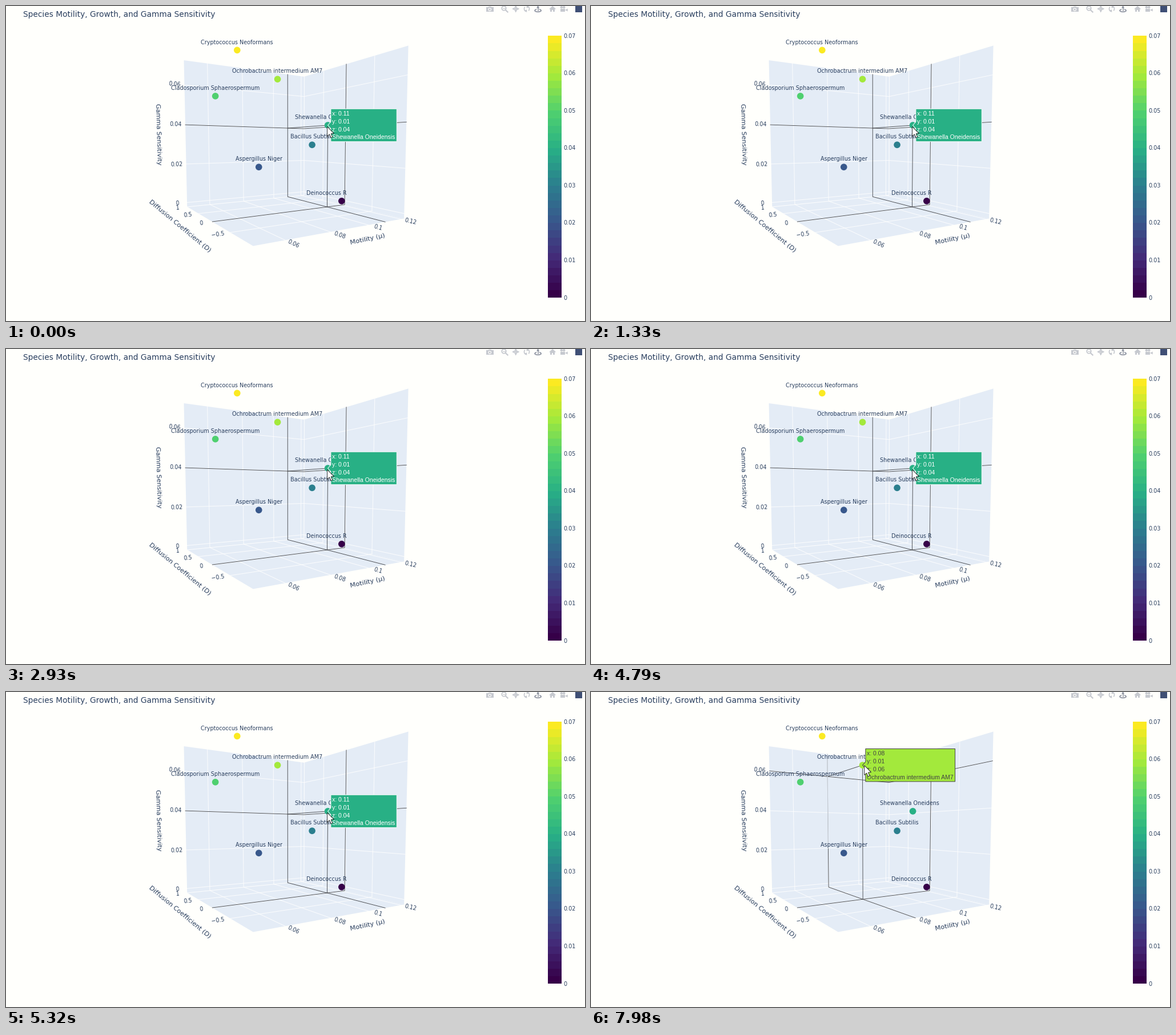
Animation, 1014 px wide and 552 px high, one loop 8 s. Source, as a matplotlib script:

```python
import math

import matplotlib.pyplot as plt
import numpy as np
from matplotlib.animation import FuncAnimation
from matplotlib.colors import LinearSegmentedColormap
from matplotlib.patches import Arc, Circle, Polygon

W, H, DPI = 1014, 552, 64
PT = 72 / DPI  # points per pixel
STEP, FRAMES, SWITCH = 50, 160, 6650

PAPER, WALL, INK = "#fffffc", "#e4ecf6", "#2a3f5f"
SPIKE, ICON = "#46484c", "#c6c9cf"
SCALE = LinearSegmentedColormap.from_list("scale", [
    "#360048", "#432a78", "#38588c", "#2b7f8e",
    "#28b085", "#4fd06f", "#a2e93c", "#fbea22"])

# Data ranges of the box: x motility, y diffusion, z sensitivity
LOW = np.array([0.0478, -0.99, -0.0022])
SPAN = np.array([0.0744, 2, 0.0744])
TICKS = [(0.06, 0.08, 0.1, 0.12), (-0.5, 0, 0.5, 1), (0, 0.02, 0.04, 0.06)]
DIFFUSION, TOP = 0.01, 0.07

# (x, z, name); the part after the bar is cut off in the label
SPECIES = [(0.06, 0.07, "Cryptococcus Neoformans"),
           (0.08, 0.06, "Ochrobactrum intermedium AM7"),
           (0.05, 0.05, "Cladosporium Sphaerospermum"),
           (0.11, 0.04, "Shewanella Oneidens|is"),
           (0.10, 0.03, "Bacillus Subtilis"),
           (0.07, 0.02, "Aspergillus Niger"),
           (0.12, 0.00, "Deinococcus R|adiodurans")]

fig = plt.figure(figsize=(W / DPI, H / DPI), dpi=DPI, facecolor=PAPER)
ax = fig.add_axes([0, 0, 1, 1])
ax.set(xlim=(0, W), ylim=(H, 0))
ax.axis("off")
ax.set_autoscale_on(False)


def unit(x, y, z):
    """Data values to box coordinates from 0 to 1."""
    return (np.array([x, y, z]) - LOW) / SPAN


def fit_camera(views):
    """Perspective matrix that sends box points to stage pixels."""
    rows, goal = [], []
    for p, pixel in views:
        for k, c in enumerate(pixel):
            row = np.zeros(11)
            row[4 * k:4 * k + 4] = *p, 1
            row[8:] = -c * np.array(p)
            rows.append(row)
            goal.append(c)
    m = np.linalg.lstsq(np.array(rows), np.array(goal), rcond=None)[0]
    return np.append(m, 1).reshape(3, 4)


CAMERA = fit_camera([
    ((0, 1, 0), (317, 352)), ((1, 1, 0), (521.5, 331)),
    ((1, 0, 0), (697, 373)), ((0, 0, 0), (433, 420)),
    ((0, 1, 1), (311.5, 95)), ((1, 1, 1), (522, 124)),
    ((1, 0, 1), (704.5, 69)),
    (unit(0.11, DIFFUSION, 0.04), (563.5, 209)),
    (unit(0.08, DIFFUSION, 0.06), (475.8, 128.5))])


def project(p):
    a, b, c = CAMERA @ np.append(p, 1)
    return np.array([a / c, b / c])


def line(*pts, color="white", lw=1.1, z=2, **kw):
    xs, ys = zip(*pts)
    return ax.plot(xs, ys, color=color, lw=lw * PT, zorder=z, **kw)[0]


def poly(*pts, color=WALL, z=1, edge="none", lw=0):
    return ax.add_patch(Polygon(pts, closed=True, fc=color, ec=edge,
                                lw=lw * PT, zorder=z))


def rect(x, y, w, h, color):
    return poly((x, y), (x + w, y), (x + w, y + h), (x, y + h), color=color)


def dot(x, y, r, color, z=5):
    ax.add_patch(Circle((x, y), r, fc=color, ec="none", zorder=z))


def text(x, y, s, size=9.6, ha="center", color=INK, z=6,
         font="DejaVu Sans"):
    """Upright text whose capitals are centred on y."""
    return ax.text(x, y + 0.365 * size, s, fontsize=size * PT, ha=ha,
                   va="baseline", color=color, family=font, zorder=z)


def tilted(at, a, b, s, size=9.6):
    """Text centred on one box point, running along the line from a to b."""
    dx, dy = project(b) - project(a)
    if dx < 0:
        dx, dy = -dx, -dy
    ax.text(*project(at), s, fontsize=size * PT, ha="center", va="center",
            rotation=-math.degrees(math.atan2(dy, dx)), color=INK,
            family="DejaVu Sans", zorder=6)


def traces(u, v, w):
    """Lines of constant x, y and z on the walls and the floor."""
    return [[(u, 1, 1), (u, 1, 0), (u, 0, 0)],
            [(1, v, 1), (1, v, 0), (0, v, 0)],
            [(0, 1, w), (1, 1, w), (1, 0, w)]]


def draw_box():
    for face in ([(0, 1, 0), (1, 1, 0), (1, 1, 1), (0, 1, 1)],
                 [(1, 1, 0), (1, 0, 0), (1, 0, 1), (1, 1, 1)],
                 [(0, 1, 0), (1, 1, 0), (1, 0, 0), (0, 0, 0)]):
        poly(*map(project, face))
    for level in zip(*TICKS):
        for path in traces(*unit(*level)):
            line(*map(project, path), alpha=0.8)


def draw_axes():
    axes = [("Motility (μ)", (0.5, 0, 0), (0, -1, 0)),
            ("Diffusion Coefficient (D)", (0, 0.5, 0), (-1, 0, 0)),
            ("Gamma Sensitivity", (0, 1, 0.5), (-1, 0, 0))]
    for k, (name, mid, out) in enumerate(axes):
        mid, out, along = np.array(mid), np.array(out), np.eye(3)[k] * 0.1
        for t in TICKS[k]:
            p = mid.astype(float)
            p[k] = (t - LOW[k]) / SPAN[k]
            q = p + 0.066 * out
            tilted(q, p, q, f"{t:g}".replace("-", "−"))
        q = mid + 0.18 * out
        tilted(q, q - along, q + along, name, 11.4)


def draw_species():
    for x, z, name in SPECIES:
        px, py = project(unit(x, DIFFUSION, z))
        shown, _, cut = name.partition("|")
        dot(px, py, 5.8, SCALE(z / TOP))
        text(px - 2.7 * len(cut), py - 14.3, shown)


def draw_colorbar(bands=35, top=52, bottom=511):
    h = (bottom - top) / bands
    for i in range(bands):
        rect(949, bottom - (i + 1) * h, 24, h + 0.3, SCALE(i / (bands - 1)))
    for i in range(8):
        y = bottom - i * (bottom - top) / 7
        text(976, y, f"{i / 100:g}", ha="left")


def arc(x, y, w, h, start, end, color=ICON):
    ax.add_patch(Arc((x, y), w, h, theta1=start, theta2=end,
                     ec=color, lw=1.7 * PT))


def arrow_head(x, y, angle, color=ICON, r=3):
    turns = (math.radians(angle + d) for d in (0, 125, 235))
    poly(*[(x + r * math.cos(a), y + r * math.sin(a)) for a in turns],
         color=color)


def draw_modebar(y=5):
    # camera
    rect(841, y - 3, 12.5, 8, ICON)
    rect(844.5, y - 4.5, 5.5, 2, ICON)
    dot(847.2, y + 1, 2.9, PAPER)
    dot(847.2, y + 1, 1.7, ICON)
    # magnifier
    arc(872, y - 1, 7.5, 7.5, 0, 360)
    line((874.8, y + 2), (878.5, y + 5.5), color=ICON, lw=2.2)
    line((870.2, y - 1), (873.8, y - 1), color=ICON)
    # pan
    for a in range(0, 360, 90):
        dx, dy = math.cos(math.radians(a)), math.sin(math.radians(a))
        line((892.7, y), (892.7 + 4 * dx, y + 4 * dy), color=ICON, lw=1.6)
        arrow_head(892.7 + 3.6 * dx, y + 3.6 * dy, a)
    # orbit
    for a in (100, 280):
        arc(912, y, 9, 9, a, a + 125)
    arrow_head(913.5, y - 3.5, 0)
    arrow_head(910.5, y + 3.5, 180)
    # turntable, the active tool
    active = "#8d93a0"
    line((931.6, y - 3), (931.6, y + 3), color=active, lw=1.5)
    arrow_head(931.6, y - 3, -90, active)
    arc(931.6, y + 3, 11, 4.6, -40, 220, active)
    # home
    poly((951, y + 0.5), (957.2, y - 5), (963.4, y + 0.5), color=ICON)
    rect(953, y, 8.4, 5, ICON)
    rect(956.1, y + 2, 2.2, 3, PAPER)
    # film camera
    rect(970.5, y - 0.5, 8.8, 5.5, ICON)
    for x in (972.8, 977.2):
        dot(x, y - 2.7, 2.2, ICON)
    arrow_head(982, y + 2, 180)
    # badge
    rect(996.5, 0, 12, 11, "#3f4f75")


def spikes(p, on_grid):
    """Guide lines from a point to the walls and across them."""
    u, v, w = p
    paths = traces(u, v, w)
    paths += [[p, foot] for foot in ((1, v, w), (u, 1, w), (u, v, 0))]
    parts = [line(*map(project, path), color=SPIKE, lw=0.9, z=4)
             for path in paths]
    if on_grid:  # a shared gridline washes out the upper spike
        parts.append(line(project((u, 1, 1)), project((u, 1, 0.3)),
                          color=WALL, lw=1.6, z=4, alpha=0.75))
    return parts


def tooltip(tip, rows, fill, ink, edge):
    x, y = tip + (5.3, 0)
    half, pitch = 28.7, 13.7
    parts = [text(x + 2.4, y + pitch * (i - 1.5), s, 10.5, "left", ink, 9,
                  "Liberation Sans") for i, s in enumerate(rows)]
    right = x + 5 + max(t.get_window_extent().width for t in parts)
    parts.append(poly(tip, (x, y - 6), (x, y - half), (right, y - half),
                      (right, y + half), (x, y + half), (x, y + 6),
                      color=fill, z=8, edge=edge, lw=1))
    return parts


def cursor(x, y):
    shape = [(0, 0), (0, 16.8), (3.9, 13.3), (6.5, 19.4), (9.2, 18.2),
             (6.7, 12.3), (11.8, 12)]
    return poly(*[(x + dx, y + dy) for dx, dy in shape],
                color="white", z=10, edge="#222222", lw=0.9)


def inspect(species, nudge, ink, edge):
    """Everything that shows while the pointer rests on one species."""
    x, z, name = species
    p = unit(x, DIFFUSION, z)
    tip = project(p)
    rows = [f"{k}: {v:.2f}" for k, v in zip("xyz", (x, DIFFUSION, z))]
    rows.append(name.replace("|", ""))
    return [*spikes(p, x in TICKS[0]),
            *tooltip(tip, rows, SCALE(z / TOP), ink, edge),
            cursor(*(tip + nudge))]


draw_box()
draw_axes()
draw_species()
draw_colorbar()
draw_modebar()
text(30, 14, "Species Motility, Growth, and Gamma Sensitivity",
     13.8, ha="left")

first = inspect(SPECIES[3], (-1, 2.5), "white", "#f4faf8")
second = inspect(SPECIES[1], (3.2, 0.5), "#444444", "#444444")


def update(i):
    late = i * STEP >= SWITCH
    for a in first:
        a.set_visible(not late)
    for a in second:
        a.set_visible(late)
    return first + second


anim = FuncAnimation(fig, update, frames=FRAMES, interval=STEP,
                     init_func=lambda: update(0), repeat=True,
                     repeat_delay=0, blit=False)
plt.show()
```
